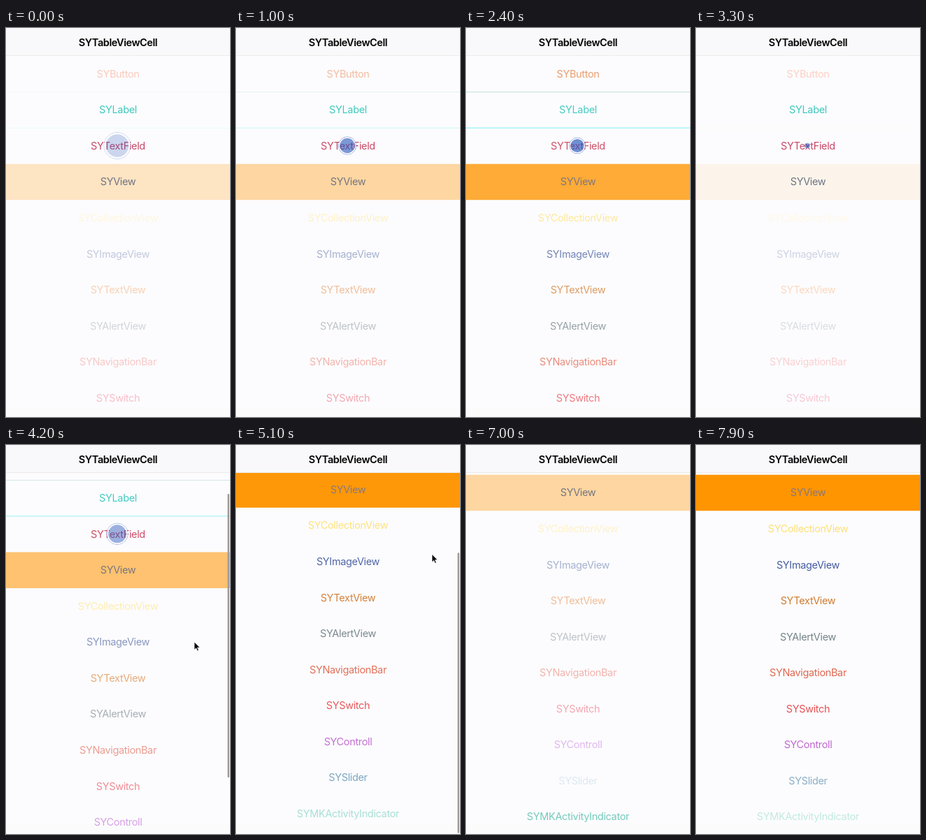
An HTML page for the animation above (8 s loop, 320 by 557 pixels).

```html
<!DOCTYPE html>
<html lang="en">
<head>
<meta charset="utf-8">
<style>
html, body { margin: 0; width: 100%; height: 100%; overflow: hidden; background: #fcfcfe; }
svg { display: block; width: 100vw; height: 100vh; }
text { font: 14.5px Inter, "Open Sans", sans-serif; letter-spacing: -.35px; text-anchor: middle; }
.title { font-weight: 600; letter-spacing: -.45px; }
</style>
</head>
<body>
<svg viewBox="0 0 320 557">
  <rect width="320" height="557" fill="#fcfcfe"/>
  <rect y="543" width="320" height="14" fill="#fbfbfc"/>
  <g id="list">
    <rect id="view" y="194.65" width="320" height="51.55"/>
    <rect id="line1" y="91.1" width="320" height="1"/>
    <rect id="line2" y="142.6" width="320" height="1"/>
  </g>
  <rect id="bar" x="316.5" width="2.5" rx="1.2" fill="#a09a98"/>
  <rect width="320" height="40" fill="#f9f9fb"/>
  <rect y="39" width="320" height="1" fill="#ebebe8"/>
  <text class="title" x="160" y="25.6">SYTableViewCell</text>
  <path id="cursor" d="M0 0V11.2L2.6 8.8 4.4 12.8 6.2 12 4.5 8.1H8Z" stroke="#fff" stroke-width=".7"/>
</svg>
<script>
const LOOP = 8000, STEP = 100, ROW = 51.55, TOP = 40, END = 152;

// label, faint colour, full colour
const rows = [
  ['SYButton', 'fcd0c4', 'e08444'],
  ['SYLabel', '3cc8bc', '4cd0c4'],
  ['SYTextField', 'c84868', 'd05468'],
  ['SYView', '6c7484', '88787c'],
  ['SYCollectionView', 'fff8e6', 'ffe074'],
  ['SYImageView', 'ccd2e2', '465ca0'],
  ['SYTextView', 'fcd8c0', 'd07c30'],
  ['SYAlertView', 'd8dce2', '748488'],
  ['SYNavigationBar', 'fad0d0', 'e06850'],
  ['SYSwitch', 'f8c8d2', 'e85054'],
  ['SYControll', 'ecd6f8', 'c068d0'],
  ['SYSlider', 'dfeaf2', '7aa4c0'],
  ['SYMKActivityIndicator', 'c4eae2', '74cabc']
];

const $ = id => document.getElementById(id);
const list = $('list');

function add(tag, attrs) {
  const el = document.createElementNS('http://www.w3.org/2000/svg', tag);
  for (const k in attrs) el.setAttribute(k, attrs[k]);
  return list.appendChild(el);
}

const labels = rows.map(([name], i) => {
  const el = add('text', { x: 160, y: TOP + (i + .5) * ROW + 5 });
  el.textContent = name;
  return el;
});
const spot = { cx: 159, cy: 168.5 };
const ring = add('circle', { ...spot, fill: 'none', stroke: '#2151b8', 'stroke-width': .9 });
const halo = add('circle', { ...spot, fill: 'none', stroke: '#fcfcfe' });
const disk = add('circle', { ...spot, fill: '#2151b8' });

function mix(a, b, k) {
  const part = (hex, i) => parseInt(hex.substr(i, 2), 16);
  return `rgb(${[0, 2, 4].map(i => Math.round(part(a, i) + (part(b, i) - part(a, i)) * k))})`;
}

const wave = (t, low, period) => (1 - Math.cos(2 * Math.PI * (t - low) / period)) / 2;
const pulse = (t, low = .37) => wave(t, low, 3) ** 1.3;

// straight runs between [time, value] points
function track(points, t) {
  const n = points.findIndex(p => p[0] > t);
  if (n === 0) return points[0][1];
  if (n < 0) return points[points.length - 1][1];
  const [[t0, a], [t1, b]] = [points[n - 1], points[n]];
  return a + (b - a) * (t - t0) / (t1 - t0);
}

const scrollPath = [[3.8, 0], [4, 14], [4.2, 41.2], [4.5, 96], [4.8, 146], [5, 157],
  [5.1, 156.5], [5.3, 153], [5.5, END]];
const cursorX = [[3.7, 267], [4.2, 269], [5.1, 280]];
const cursorY = [[3.8, 323], [4, 309], [4.2, 282], [4.5, 227], [4.8, 177], [5, 159], [5.1, 156.5]];

function draw(t) {
  const k = pulse(t);
  labels.forEach((el, i) => {
    const level = i === 12 ? wave(t, .3, 1.5) : i === 11 ? pulse(t, .75) : k;
    el.setAttribute('fill', mix(rows[i][1], rows[i][2], level));
  });
  $('view').setAttribute('fill', mix('fcfcfe', 'ff9500', .06 + .94 * wave(t, .42, 3)));
  $('line1').setAttribute('fill', mix('fcfcfe', 'a8d0c8', k));
  $('line2').setAttribute('fill', mix('fcfcf4', '80f0f0', Math.min(1, k * 1.6)));

  // expanding, fading touch ripple
  const p = ((t + 1.47) % 1.5) / 1.5, r = 19.5 * p;
  const alpha = Math.min(.64, .2 + 1.1 * (1 - p));
  ring.setAttribute('r', r);
  ring.setAttribute('opacity', alpha);
  halo.setAttribute('r', r * .92);
  halo.setAttribute('stroke-width', r * .1);
  disk.setAttribute('r', r * .85);
  disk.setAttribute('opacity', alpha);

  const s = track(scrollPath, t);
  list.setAttribute('transform', `translate(0 ${-s})`);
  $('bar').setAttribute('y', TOP + .73 * s);
  $('bar').setAttribute('height', 406 - Math.max(0, s - END));
  $('bar').setAttribute('opacity', track([[3.7, 0], [3.9, 1], [5.5, 1], [5.9, 0]], t));
  $('cursor').setAttribute('transform', `translate(${track(cursorX, t)} ${track(cursorY, t)})`);
  $('cursor').setAttribute('opacity', t >= 3.7 && t < 5.6 ? 1 : 0);
}

const start = performance.now();
function tick() {
  const ms = (performance.now() - start) % LOOP;
  draw(Math.floor(ms / STEP) * STEP / 1000);
  requestAnimationFrame(tick);
}
tick();
</script>
</body>
</html>
```
